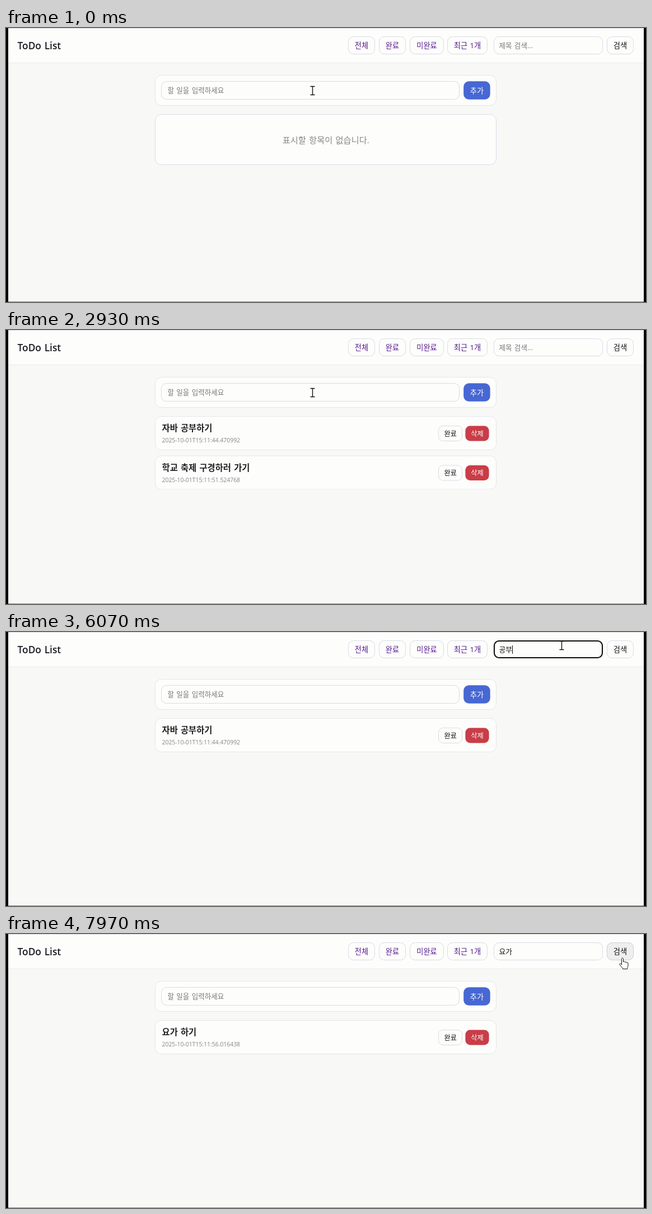
These frames come from a looping animation (1143 by 490 pixels, 8 s). An HTML page:

```html
<!DOCTYPE html>
<html lang="ko">
<head>
<meta charset="utf-8">
<title>ToDo List</title>
<style>
  html, body { margin: 0; width: 100%; height: 100%; overflow: hidden; background: #000; }
  svg { display: block; width: 100%; height: 100%; }
  text {
    font: 13.2px "Open Sans", "Noto Sans CJK KR", "Noto Sans CJK JP", sans-serif;
    word-spacing: .08em; fill: #111; white-space: pre;
  }
  .mid { text-anchor: middle; }
  .box { fill: #fdfdfc; stroke: #dadae8; }
  .card { fill: #fdfdfc; stroke: #e6e6ec; }
  .ring { fill: none; stroke: #0a0a0a; stroke-width: 2; }
  .brand { font-size: 17.3px; font-weight: 600; fill: #1b1b22; }
  .link { fill: #551a8b; }
  .hint { font-size: 12.55px; fill: #777; }
  .typed { font-size: 12.8px; }
  .title { font-size: 15.36px; font-weight: 700; fill: #222226; }
  .date { font-size: 10.4px; fill: #85858a; }
  .small { font-size: 12.2px; }
  .light { fill: #fff; }
  .none { font-size: 15.3px; fill: #888; }
  .hover { fill: #efeeee; stroke: #cfcfda; }

  .anim { animation: 8s step-end infinite; }
  #empty { animation-name: empty; }
  #java { animation-name: java; }
  #fest { animation-name: fest; }
  #yoga { animation-name: yoga; }
  #addFocus { animation-name: addFocus; }
  #findFocus { animation-name: findFocus; }
  #recent { animation-name: recent; animation-timing-function: linear; }
  .over { animation-name: over; }
  #beam { animation-name: beam; }
  #arrow { animation-name: arrow; }
  #hand { animation-name: hand; }
  #cursor { animation: move 8s ease-in-out infinite; }

  @keyframes empty { 0% { opacity: 1 } 13.75%, 100% { opacity: 0 } }
  @keyframes java {
    0% { opacity: 0 } 13.75% { opacity: 1 } 84.5%, 100% { opacity: 0 }
  }
  @keyframes fest {
    0% { opacity: 0; transform: translateY(70.5px) }
    33.75% { opacity: 1; transform: translateY(70.5px) }
    63.75% { opacity: 0; transform: none }
    84.5% { opacity: 1; transform: none }
    98.75%, 100% { opacity: 0; transform: none }
  }
  @keyframes yoga {
    0% { opacity: 0; transform: translateY(141px) }
    46.5% { opacity: 1; transform: translateY(141px) }
    63.75% { opacity: 0; transform: none }
    98.75%, 100% { opacity: 1; transform: none }
  }
  @keyframes addFocus {
    0%, 13.75%, 33.75%, 46.5%, 100% { opacity: 0 }
    .9%, 17.5%, 40% { opacity: 1 }
  }
  @keyframes findFocus {
    0%, 63.1%, 84%, 98.5%, 100% { opacity: 0 }
    55.7%, 73.7%, 88.5% { opacity: 1 }
  }
  @keyframes recent {
    0%, 53.1% { opacity: 0 } 53.5%, 53.9% { opacity: .45 } 54.6%, 100% { opacity: 0 }
  }
  @keyframes over {
    0%, 71%, 86.3% { opacity: 0 }
    61.6%, 82.4%, 97.2%, 100% { opacity: 1 }
  }
  @keyframes beam {
    0%, 53.55%, 71%, 86.3% { opacity: 1 }
    52.16%, 61.6%, 82.4%, 97.2%, 100% { opacity: 0 }
  }
  @keyframes arrow { 0%, 53.1%, 100% { opacity: 0 } 52.16% { opacity: 1 } }
  @keyframes hand {
    0%, 53.55%, 71%, 86.3% { opacity: 0 }
    53.1%, 61.6%, 82.4%, 97.2%, 100% { opacity: 1 }
  }
  @keyframes move {
    0% { transform: translate(547px, 112px) }
    51.875% { transform: translate(547px, 112px); animation-timing-function: linear }
    53% { transform: translate(770px, 45px); animation-timing-function: linear }
    53.75% { transform: translate(893px, 47px); animation-timing-function: ease-out }
    55.625%, 60.375% { transform: translate(985px, 32px) }
    62%, 70% { transform: translate(1095px, 40px) }
    73.25%, 81.25% { transform: translate(992px, 24px) }
    83.125%, 85.625% { transform: translate(1097px, 42px) }
    88.125%, 95.625% { transform: translate(1005px, 35px) }
    98.125%, 100% { transform: translate(1101px, 43px) }
  }
</style>
</head>
<body>
<svg viewBox="0 0 1143 490">
  <defs>
    <g id="shell">
      <rect class="card" x="266.5" y="154.5" width="609" height="60" rx="11"/>
      <rect class="box" x="772.5" y="171.5" width="42" height="27" rx="8"/>
      <text class="small mid" x="793.7" y="189.5">완료</text>
      <rect x="820.4" y="171.4" width="42.2" height="27.2" rx="8.5" fill="#c93d47"/>
      <text class="small mid light" x="841.5" y="189.5">삭제</text>
    </g>
  </defs>

  <!-- page -->
  <rect width="1143" height="490"/>
  <rect x="4" width="1135" height="490" fill="#f8f8f7"/>
  <rect x="4" width="1135" height="62" fill="#fdfdfc"/>
  <rect x="4" y="62" width="1135" height="1" fill="#ebebee"/>
  <rect x="4" width="1135" height="1" fill="#d9d9dc"/>
  <rect x="4" y="489" width="1135" height="1" fill="#85858c"/>

  <!-- header -->
  <text class="brand" x="20.5" y="38.3">ToDo List</text>
  <g class="box">
    <rect x="611.5" y="15.5" width="47" height="31" rx="9"/>
    <rect x="666.5" y="15.5" width="47" height="31" rx="9"/>
    <rect x="721.5" y="15.5" width="60" height="31" rx="9"/>
    <rect x="788.5" y="15.5" width="71" height="31" rx="9"/>
    <rect x="871.5" y="15.5" width="194" height="31" rx="9"/>
    <rect x="1073.5" y="15.5" width="47" height="31" rx="9"/>
  </g>
  <rect id="recent" class="hover anim" x="788.5" y="15.5" width="71" height="31" rx="9"/>
  <rect class="hover over anim" x="1073.5" y="15.5" width="47" height="31" rx="9"/>
  <text class="link mid" x="635" y="36.4">전체</text>
  <text class="link mid" x="690" y="36.4">완료</text>
  <text class="link mid" x="751.5" y="36.4">미완료</text>
  <text class="link mid" x="824" y="36.4">최근 1개</text>
  <text class="mid" x="1097" y="36.4">검색</text>
  <text id="findHint" class="hint" x="880.5" y="35.7">제목 검색...</text>
  <text id="findText" class="typed" x="880.5" y="36.2"></text>
  <g id="findFocus" class="anim">
    <rect class="ring" x="872" y="16" width="193" height="30" rx="8.5"/>
    <rect id="findCaret" y="24" width="1" height="15"/>
  </g>

  <!-- entry form -->
  <rect class="card" x="266.5" y="84.5" width="609" height="54" rx="11"/>
  <rect class="box" x="277.5" y="95.5" width="532" height="32" rx="9"/>
  <rect x="817.2" y="95.3" width="47.5" height="32.5" rx="9.5" fill="#4767d3"/>
  <text class="mid light" x="841" y="117">추가</text>
  <text id="addHint" class="hint" x="288.5" y="116">할 일을 입력하세요</text>
  <text id="addText" class="typed" x="288.5" y="116.5"></text>
  <g id="addFocus" class="anim">
    <rect class="ring" x="278" y="96" width="531" height="31" rx="8.5"/>
    <rect id="addCaret" y="104" width="1" height="15"/>
  </g>

  <!-- list -->
  <g id="empty" class="anim">
    <rect class="box" x="266.5" y="154.5" width="609" height="90" rx="11"/>
    <text class="none mid" x="571.3" y="205.7">표시할 항목이 없습니다.</text>
  </g>
  <g id="java" class="anim">
    <use href="#shell"/>
    <text class="title" x="278.5" y="181">자바 공부하기</text>
    <text class="date" x="278.5" y="201.2">2025-10-01T15:11:44.470992</text>
  </g>
  <g id="fest" class="anim">
    <use href="#shell"/>
    <text class="title" x="278.5" y="181">학교 축제 구경하러 가기</text>
    <text class="date" x="278.5" y="201.2">2025-10-01T15:11:51.524768</text>
  </g>
  <g id="yoga" class="anim">
    <use href="#shell"/>
    <text class="title" x="278.5" y="181">요가 하기</text>
    <text class="date" x="278.5" y="201.2">2025-10-01T15:11:56.016438</text>
  </g>

  <!-- pointer -->
  <g id="cursor">
    <path id="beam" class="anim" d="M-3.5-7.5H4.5M.5-7.5V7.5M-3.5 7.5H4.5"
      fill="none" stroke="#111" stroke-width="1.4"/>
    <path id="arrow" class="anim" d="M0 0V15L3.6 11.8 6 17.2 8.3 16.2 6 11H10.8Z" fill="#fff" stroke="#111"/>
    <path id="hand" class="anim" fill="#fff" stroke="#111" stroke-linejoin="round"
      d="M-1.5 1.5C-1.5-.5 1.5-.5 1.5 1.5V7C2 5.2 4.5 6 4.5 7.8C5 6.2 7.3 6.6 7.3 8.6C8 7.3 10 7.8 10 9.8V13.5C10 16 8.5 17 8.5 19.5H.5C.5 17.5-4 14-5 11.5C-5.6 9.8-3.6 9-2.6 10.4L-1.5 12Z"/>
  </g>
</svg>
<script>
  const LOOP = 8000;
  const LEADS = 'ㄱㄲㄴㄷㄸㄹㅁㅂㅃㅅㅆㅇㅈㅉㅊㅋㅌㅍㅎ';
  const TAILS = ' ㄱㄲㄳㄴㄵㄶㄷㄹㄺㄻㄼㄽㄾㄿㅀㅁㅂㅄㅅㅆㅇㅈㅊㅋㅌㅍㅎ';
  const BASE = 0xAC00;
  const $ = id => document.getElementById(id);

  // Every state of the field while a Hangul text is typed key by key.
  function strokes(text) {
    const out = [];
    let done = '', prev = -1;
    for (const ch of text) {
      const code = ch.charCodeAt(0) - BASE;
      if (code >= 0) {
        const lead = LEADS[Math.floor(code / 588)];
        const tail = TAILS.indexOf(lead);
        const joins = prev >= 0 && prev % 28 === 0 && tail > 0;
        out.push(joins ? done.slice(0, -1) + String.fromCharCode(BASE + prev + tail) : done + lead);
        if (code % 28) out.push(done + String.fromCharCode(BASE + code - code % 28));
      }
      done += ch;
      out.push(done);
      prev = code;
    }
    return out;
  }

  // erase: ms per deleted syllable, 0 clears the field at once
  const entry = (text, start, end, clear, erase) =>
    ({ text, start, end, clear, erase, keys: strokes(text) });

  const fields = [
    { name: 'add', entries: [
      entry('자바 공부하기', 150, 980, 1100, 0),
      entry('학교 축제 구경하러 가기', 1560, 2620, 2700, 0),
      entry('요가 하기', 3260, 3670, 3720, 0)
    ] },
    { name: 'find', entries: [
      entry('공부', 4500, 4780, 6110, 70),
      entry('축제', 6230, 6460, 7130, 70),
      entry('요가', 7400, 7640, LOOP, 0)
    ] }
  ];

  function valueAt(entries, t) {
    const e = entries.findLast(item => t >= item.start);
    if (!e) return '';
    if (t >= e.clear) {
      const gone = e.erase ? 1 + Math.floor((t - e.clear) / e.erase) : e.text.length;
      return e.text.slice(0, Math.max(0, e.text.length - gone));
    }
    const last = e.keys.length - 1;
    return e.keys[Math.min(last, Math.floor((t - e.start) / (e.end - e.start) * last))];
  }

  const clock = $('cursor').getAnimations()[0];

  function draw() {
    const t = (clock.currentTime || 0) % LOOP;
    for (const { name, entries } of fields) {
      const value = valueAt(entries, t);
      const text = $(name + 'Text'), caret = $(name + 'Caret');
      text.textContent = value;
      $(name + 'Hint').style.display = value ? 'none' : '';
      caret.style.display = value ? '' : 'none';
      caret.setAttribute('x', Number(text.getAttribute('x')) + text.getComputedTextLength());
    }
    requestAnimationFrame(draw);
  }
  draw();
</script>
</body>
</html>
```
